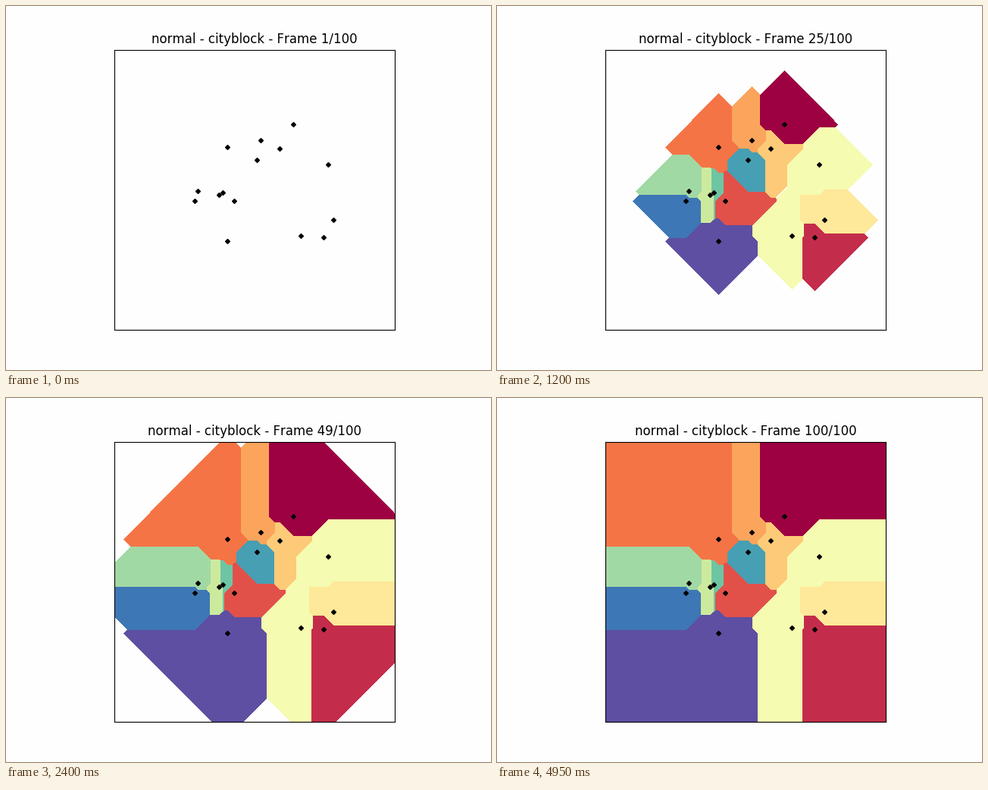
Recreate the animation shown at these times as a matplotlib script. Size 640x480 px, loop 5 s.

```python
import matplotlib.pyplot as plt
import numpy as np
from matplotlib.animation import FuncAnimation
from matplotlib.colors import to_rgb

FRAMES = 100
GROWTH = 2.8  # radius gained per frame, in pixels
PAPER = "#fefefe"

# Key points: the scattered sites in pixels, ordered along the colour map.
# Cells, edges and growth all follow from these.
sites = np.array([
    (379, 156), (419, 305), (301, 257), (292, 186), (336, 177),
    (361, 188), (432, 282), (425, 209), (389, 303), (281, 249),
    (253, 244), (286, 246), (331, 203), (249, 257), (292, 310),
])

plt.rcParams["text.kerning_factor"] = 6  # unkerned title
fig, ax = plt.subplots(figsize=(6.4, 4.8), dpi=100, facecolor=PAPER)
ax.set_facecolor(PAPER)

# The axes are the largest square in the default subplot, in pixel units.
width, height = fig.get_size_inches() * fig.dpi
box = ax.get_position()
half = box.height * height / 2
cx, cy = (box.x0 + box.x1) / 2 * width, (1 - (box.y0 + box.y1) / 2) * height
left, right = int(cx - half), int(np.ceil(cx + half))
top, bottom = int(cy - half), int(np.ceil(cy + half))

# City-block distance from every pixel to every site.
x, y = np.meshgrid(np.arange(left, right), np.arange(top, bottom))
dist = np.array([abs(x - sx) + abs(y - sy) for sx, sy in sites])
nearest = dist.min(axis=0)

colors = plt.get_cmap("Spectral")(np.linspace(0, 1, len(sites)))[:, :3]
colors[7:9] = colors[7:9].mean(axis=0)  # the two middle cells share a pale yellow
cells = colors[dist.argmin(axis=0)]

image = ax.imshow(cells, extent=(left, right, bottom, top), interpolation="nearest")
ax.plot(*sites.T, "kD", markersize=3)
ax.set(xlim=(cx - half, cx + half), ylim=(cy + half, cy - half), xticks=[], yticks=[])
title = ax.set_title("")


def update(i):
    grown = nearest <= GROWTH * (i + 1)
    image.set_data(np.where(grown[..., None], cells, to_rgb(PAPER)))
    title.set_text(f"normal - cityblock - Frame {i + 1}/{FRAMES}")
    return image, title


anim = FuncAnimation(fig, update, frames=FRAMES, interval=50, repeat=True)
plt.show()
```
